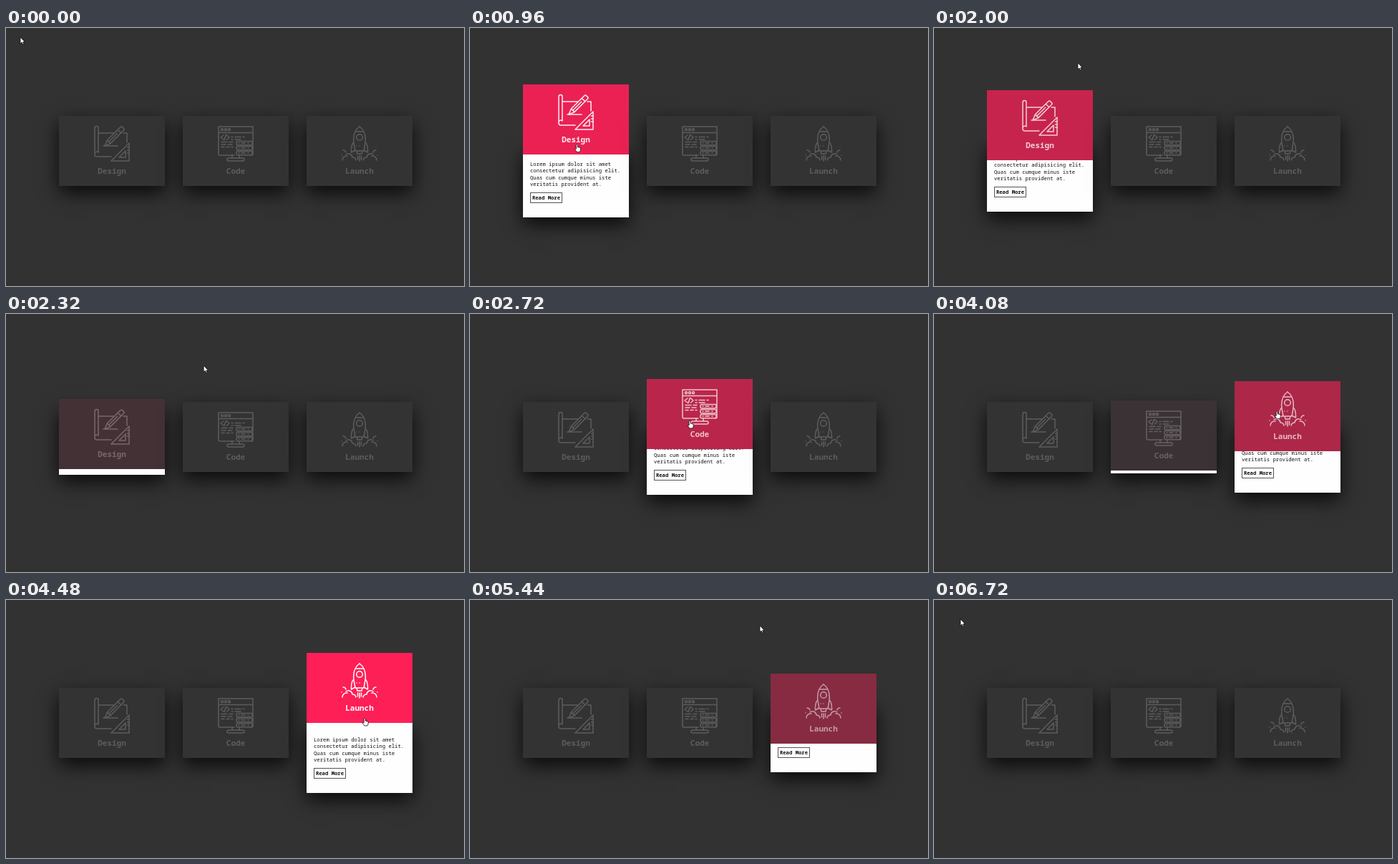
Animation of 640x361 px, one loop 7040 ms. Source, as an HTML page:

```html
<!DOCTYPE html>
<html lang="en">
<head>
<meta charset="utf-8">
<title>Hover cards</title>
<style>
html, body { margin: 0; width: 100%; height: 100%; overflow: hidden; background: #323232; }
body { position: relative; font-family: "Noto Sans Mono", "DejaVu Sans Mono", monospace; }
.card { position: absolute; top: 74px; width: 148px; height: 196px; }
.face { position: absolute; left: 0; width: 100%; height: 98px; }
.back { top: 98px; background: #fefefe; color: #111; box-shadow: 0 10px 25px rgba(0, 0, 0, .8); }
.front { top: 0; color: #fff; }
.front svg { position: absolute; left: 49px; top: 14px; }
.front b { position: absolute; top: 69px; width: 100%; text-align: center; font-size: 11px; line-height: 16px; }
p { position: absolute; left: 10px; top: 19px; margin: 0; font-size: 7.25px; line-height: 9.4px; white-space: pre; }
.more { position: absolute; box-sizing: border-box; left: 10px; top: 63px; width: 45px; height: 15px;
  border: 1px solid #555; font-size: 7.25px; font-weight: bold; line-height: 13px; text-align: center; white-space: nowrap; }
svg { fill: none; stroke: #fff; stroke-width: 1.5; stroke-linecap: round; stroke-linejoin: round; overflow: visible; }
#cursor { position: absolute; left: 0; top: 0; fill: #fff; stroke: #111; stroke-width: .8; }
</style>
</head>
<body>
<script>
const LOOP = 7040, STEP = 80, DURATION = 700, SHIFT = 49;

const stroke = (d, dash = "none") => `<path d="${d}" stroke-dasharray="${dash}"/>`;
const circle = (x, y, r) => `<circle cx="${x}" cy="${y}" r="${r}"/>`;
const rect = (x, y, w, h, r) => `<rect x="${x}" y="${y}" width="${w}" height="${h}" rx="${r}"/>`;
const mirror = shapes => shapes + `<g transform="matrix(-1 0 0 1 50 0)">${shapes}</g>`;
const repeat = (n, shape) => Array.from({ length: n }, (_, i) => shape(i)).join("");

const icons = {
  // Paper roll, pencil, set square
  Design: stroke("M6 37V3A2.5 2.5 0 0 0 1 3V40A3 3 0 0 0 4 43H24M6 37A3 3 0 0 0 1 40M6 10H28M41 10H46V23M13 28H33")
    + `<g transform="translate(15 28) rotate(-45)">${stroke("M0 0L8 -3.2H34A2 2 0 0 1 36 -1.2V1.2A2 2 0 0 1 34 3.2H8ZM8 -3.2V3.2M29 -3.2V3.2M8 0H25")}</g>`
    + stroke("M24 49H49V24ZM35 44H44V35Z")
    + repeat(3, i => stroke(`M46.5 ${30 + 4 * i}H49`)),

  // Browser window with code, servers and a stand
  Code: stroke("M23 41H3A2 2 0 0 1 1 39V1H49V39A2 2 0 0 1 47 41M1 9.5H49M8 13L4 16L8 19M11.5 12.5L9 19.5M12.5 13L16 16L12.5 19")
    + repeat(3, i => circle(6 + 5 * i, 5.3, 1.5))
    + repeat(2, i => stroke(`M19 ${15.5 + 3.5 * i}H${38 - 4 * i}`, "2 3 8 3"))
    + repeat(3, i => stroke(`M5 ${22.5 + 3.5 * i}H21`, `${8 - 2 * i} 3`))
    + repeat(3, i => rect(26, 21.5 + 7 * i, 22, 5.2, 1.5) + stroke(`M29 ${24 + 7 * i}H45`, "1 3 5 4"))
    + stroke("M20 41V45M30 41V45") + rect(13, 45, 24, 4, 2),

  // Rocket above clouds
  Launch: mirror(stroke("M25 1Q15 8 17 24L19 35H25M19.5 8H25M17 23Q13 26 13.5 37L19 34M21 35L22 39H25M22.5 42V47")
    + stroke("M1 48A6 6 0 0 1 8 42M6 40A5.5 5.5 0 0 1 15 44A5 5 0 0 1 20 48M2 34A4 4 0 0 1 6 37M0 41H.1"))
    + circle(25, 16, 4.3) + stroke("M21 28H29", "0 4") + stroke("M25 42V49")
};

// Left edge, hover start and hover end of each card
const cards = [["Design", 74, 520, 1867], ["Code", 247, 2450, 3547], ["Launch", 420, 3840, 5200]]
  .map(([name, left, enter, leave]) => {
    const el = document.createElement("div");
    el.className = "card";
    el.style.left = left + "px";
    el.innerHTML = `<div class="face back"><p>Lorem ipsum dolor sit amet
consectetur adipisicing elit.
Quas cum cumque minus iste
veritatis provident at.</p><div class="more">Read More</div></div>
<div class="face front"><div class="content"><svg width="50" height="50">${icons[name]}</svg><b>${name}</b></div></div>`;
    document.body.append(el);
    const [back, front, content] = [".back", ".front", ".content"].map(s => el.querySelector(s));
    return { back, front, content, enter, leave };
  });

document.body.insertAdjacentHTML("beforeend", `<svg id="cursor" width="14" height="14"><path/></svg>`);
const cursor = document.getElementById("cursor");
const ARROW = "M0 0V9L2 7L3.5 10L5 9.5L3.6 6.6H6.2Z";
const HAND = "M-1 1Q0 -.6 1 1V4L5 5Q6 8 4 11H0L-3 7L-1 6.5Z";

// Cursor turning points: time, x, y
const route = [
  [160, 20, 13], [800, 140, 166], [1520, 182, 150], [2000, 201, 49], [2240, 270, 57], [2720, 307, 149],
  [3200, 345, 165], [3680, 440, 50], [3840, 466, 118], [4480, 501, 165], [5440, 405, 36], [6560, 45, 30], [6720, 37, 27]
];

const mix = (a, b, k) => a + (b - a) * k;
const clamp = x => Math.min(1, Math.max(0, x));

function cursorAt(t) {
  const next = route.findIndex(p => p[0] > t);
  const b = route.at(next), a = route[Math.max(0, next - 1)] ;
  if (next < 1) return b.slice(1);
  const k = (t - a[0]) / (b[0] - a[0]);
  return [mix(a[1], b[1], k), mix(a[2], b[2], k)];
}

// CSS "ease": cubic-bezier(.25, .1, .25, 1), solved for x by bisection
function ease(x) {
  const bezier = (a, b, s) => 3 * a * s * (1 - s) ** 2 + 3 * b * s * s * (1 - s) + s ** 3;
  let s = .5;
  for (let d = .25; d > 1e-6; d /= 2) s += bezier(.25, .25, s) < x ? d : -d;
  return bezier(.1, 1, s);
}

function draw(t) {
  let hover = false;
  for (const c of cards) {
    const progress = from => ease(clamp((t - from) / DURATION));
    const open = clamp(progress(c.enter) - progress(c.leave));
    const y = Math.round(SHIFT * (1 - open));
    c.front.style.transform = `translateY(${y}px)`;
    c.back.style.transform = `translateY(${-y}px)`;
    c.front.style.background = `rgb(${mix(51, 255, open)}, ${mix(51, 31, open)}, ${mix(51, 87, open)})`;
    c.content.style.opacity = mix(.2, 1, open);
    hover ||= t >= c.enter && t < c.leave;
  }
  const [x, y] = cursorAt(t);
  cursor.style.transform = `translate(${x}px, ${y}px)`;
  cursor.firstChild.setAttribute("d", hover ? HAND : ARROW);
}

const start = performance.now();
function tick() {
  const t = (performance.now() - start) % LOOP;
  draw(Math.floor(t / STEP) * STEP);
  requestAnimationFrame(tick);
}
tick();
</script>
</body>
</html>
```
